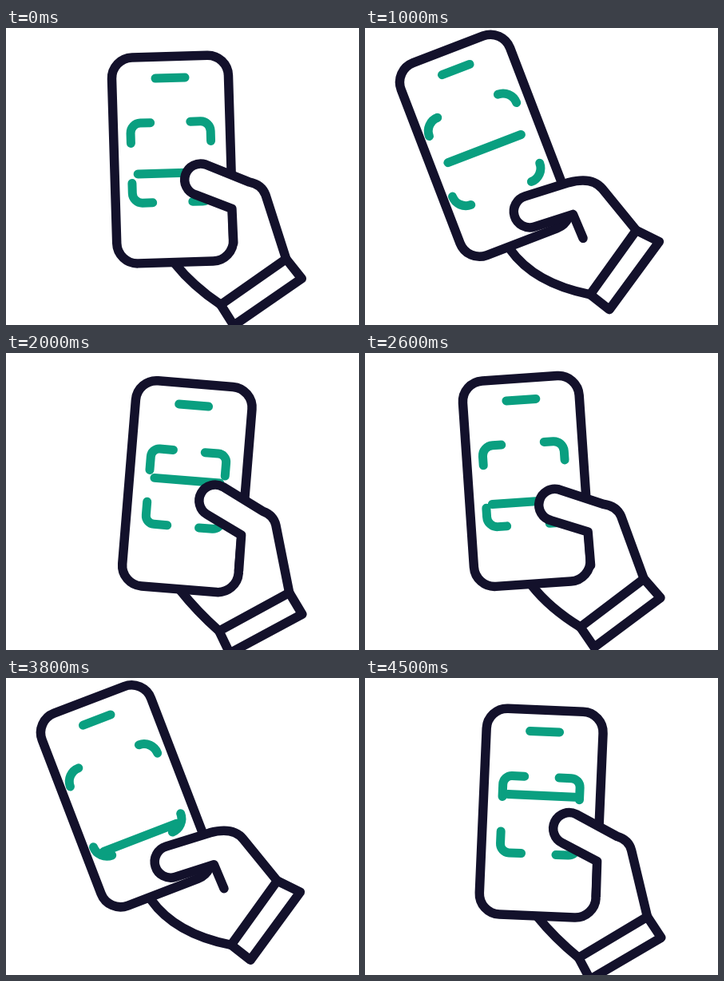
These frames come from a looping animation (442 px wide and 372 px high, 4600 ms). An HTML page:

```html
<!DOCTYPE html>
<html lang="en">
<head>
<meta charset="utf-8">
<title>Phone scan</title>
<style>
  html, body { margin: 0; width: 100%; height: 100%; overflow: hidden; background: #fff; }
  svg { display: block; width: 100vw; height: 100vh; }
  svg * { stroke-width: 11.5; stroke-linecap: round; stroke-linejoin: round; }
  .ink { stroke: #13112b; fill: #fff; }
  .scan { stroke: #0a9f80; fill: none; stroke-width: 11; }
  .line { fill: none; }
</style>
</head>
<body>
<svg viewBox="0 0 442 372">
  <g id="rig">
    <rect class="ink" x="-73" y="-129" width="146" height="258" rx="26"/>
    <path class="scan" d="M-18.5 -102H18.5"/>
    <path class="scan" id="brackets"/>
    <path class="scan" id="beam"/>
    <path class="ink line" id="palm"/>
    <path class="ink" id="thumb"/>
    <path class="ink" id="cuff"/>
  </g>
</svg>
<script>
const LOOP = 4600, STEP = 100, CYCLE = 2550;

// Keys are [ms, value] within one swing cycle.
const TILT = [[-350, 6.5], [600, -21], [1500, -21], [2100, 6.5], [2200, 6.5], [3150, -21]];
const BOB = [[-50, 5.5], [280, -8], [525, 0.2], [850, -4], [1240, -3.2], [1800, 17],
             [2050, -1.5], [2500, 5.5], [2830, -8]];
const BEAM = [[-70, 12], [240, 55], [738, -56], [1240, 55], [1765, -58],
              [2120, 10], [2480, 12], [2790, 55]];

const $ = id => document.getElementById(id);
const mix = (a, b, k) => a + (b - a) * k;
const draw = (id, d) => $(id).setAttribute('d', d);

function track(keys, t) {
  const i = keys.findIndex(key => key[0] > t);
  const [t0, a] = keys[i - 1], [t1, b] = keys[i];
  return mix(a, b, (1 - Math.cos(Math.PI * (t - t0) / (t1 - t0))) / 2);
}

function bracketPath(k) {
  const xs = [mix(-61, -47.5, k), mix(56, 45.5, k)];
  const ys = [mix(-54, -43.5, k), mix(63, 49.5, k)];
  const arm = mix(18, 28, k), r = mix(18, 10, k);
  let d = '';
  xs.forEach((x, i) => ys.forEach((y, j) => {
    const sx = i ? -1 : 1, sy = j ? -1 : 1;
    d += `M${x} ${y + sy * arm}V${y + sy * r}` +
         `A${r} ${r} 0 0 ${i === j ? 1 : 0} ${x + sx * r} ${y}H${x + sx * arm}`;
  }));
  return d;
}

function drawHand(k, bob) {
  const slide = 1 - Math.pow(1 - k, 1.5);
  const lag = -0.5 * bob * (1 - slide);
  const at = (x0, y0, x1, y1, dy = 0) => [mix(x0, x1, slide), mix(y0, y1, slide) + dy];

  const wrist = at(138.7, 167, 138.3, 121.5);
  const heel = at(56, 221.3, 54.5, 176.5);
  draw('cuff', `M${wrist}L${at(160.5, 190.5, 156.5, 147)}L${at(71.8, 247.6, 70, 203)}L${heel}Z`);
  draw('palm', `M${at(-17.5, 132, 2, 130)}Q${at(-4.4, 183.4, 25, 154)} ${heel}`);

  const r = 20, angle = mix(4, 26.8, k) * Math.PI / 180;
  const tip = at(22.7, 95.3, 36.6, 13.5, lag);
  const edge = side => [tip[0] - side * r * Math.sin(angle), tip[1] + side * r * Math.cos(angle)];
  draw('thumb', `M${at(73, 150.5, 73, 99, lag)}L${at(72, 118, 72.5, 54, lag)}L${edge(1)}` +
    `A${r} ${r} 0 0 1 ${edge(-1)}L${at(81.3, 79, 97.5, 22.3, lag)}` +
    `Q${at(111.4, 82.1, 110.6, 26, lag)} ${at(117.7, 101.4, 114.5, 38, lag)}L${wrist}`);
}

function render(time) {
  const t = Math.floor(time % LOOP / STEP) * STEP % CYCLE;
  const tilt = track(TILT, t), bob = track(BOB, t), y = track(BEAM, t);
  const k = (tilt + 21) / 27.5; // 0 leaning, 1 upright

  $('rig').setAttribute('transform',
    `translate(153.6 ${327 + bob}) rotate(${tilt}) translate(60 -165.5)`);
  draw('brackets', bracketPath(k));
  draw('beam', `M${mix(-51, -41, k)} ${y}H${mix(47, 40, k)}`);
  drawHand(k, bob);
}

const start = performance.now();
function tick() {
  render(performance.now() - start);
  requestAnimationFrame(tick);
}
tick();
</script>
</body>
</html>
```
